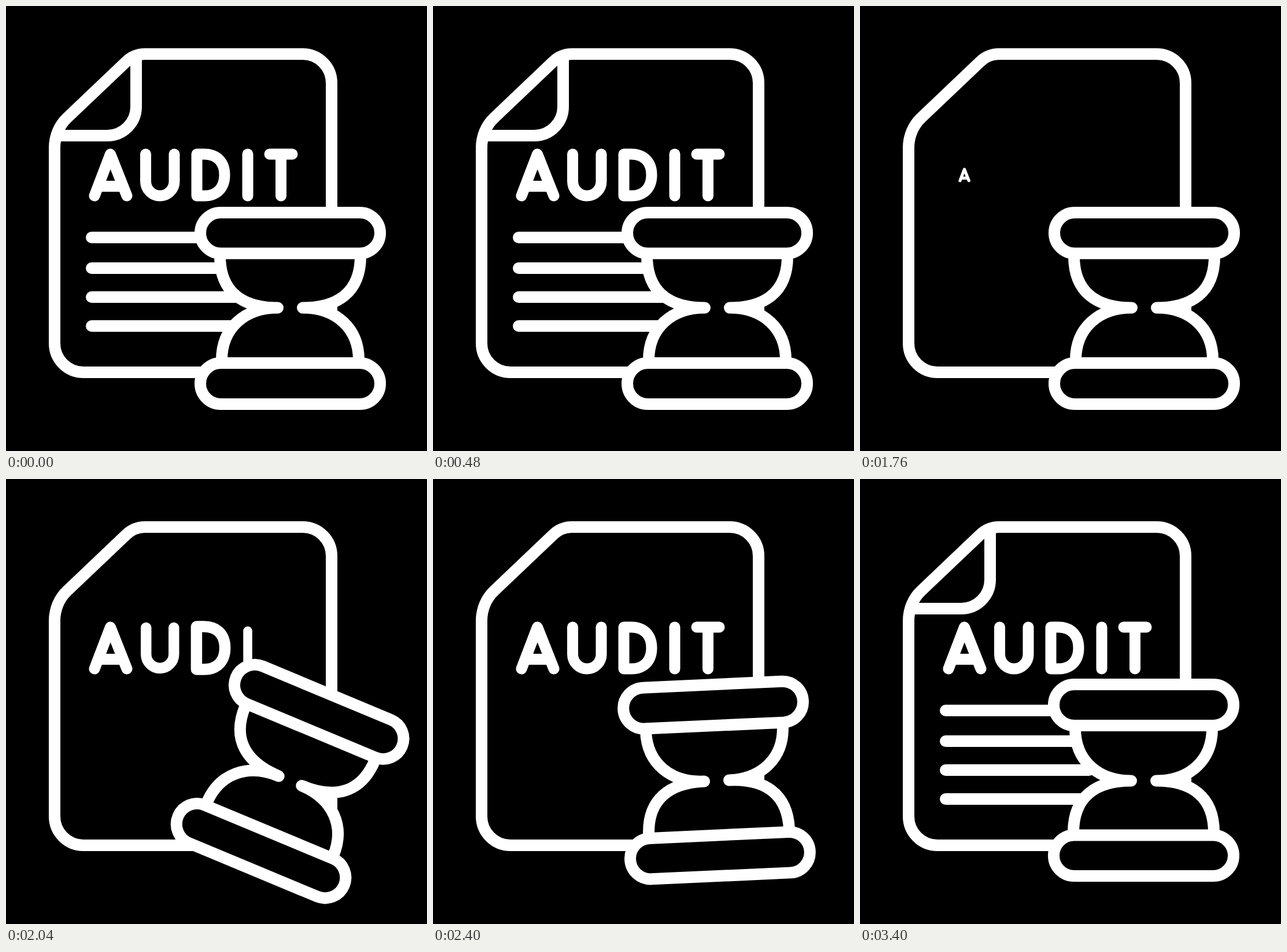
Animation, 728 px wide and 769 px high, one loop 3840 ms. Source, as an HTML page:

```html
<!DOCTYPE html>
<html lang="en">
<head>
<meta charset="utf-8">
<title>Audit</title>
<style>
  html, body { margin: 0; width: 100%; height: 100%; overflow: hidden; background: #000; }
  svg { display: block; width: 100%; height: 100%; }
  path, rect { fill: none; stroke: #fff; stroke-width: 20; stroke-linejoin: round; }
  #lines path, #glass path { stroke-linecap: round; }
  #word path { stroke-width: 19; stroke-linecap: round; }
  #glass rect { fill: #000; }
  #glass .body { fill: #000; stroke: none; }
</style>
</head>
<body>
<svg viewBox="0 0 728 769" role="img" aria-label="AUDIT">
  <g id="doc">
    <path d="M240 83H513A50 50 0 0 1 563 133V583A50 50 0 0 1 513 633H134A50 50 0 0 1 84 583V245C84 225 92 206 106 193L207 97C216 88 228 83 240 83Z"/>
    <path id="fold" pathLength="1" d="M225 88V174A50 50 0 0 1 175 224H90"/>
    <g id="word">
      <path d="M153 328L180.500 256L209 328M166 311.500H196"/>
      <path d="M241.500 256V303A24.750 25 0 0 0 291 303V256"/>
      <path d="M330 256H343C365 256 378 270 378 292S365 328 343 328H330Z"/>
      <path d="M418 256V328"/>
      <path d="M456 256H495M475.500 256V328"/>
    </g>
    <g id="lines"></g>
  </g>
  <g id="glass">
    <path class="body" d="M370 432C370 495 410 521.500 470 521.500C412 521.500 373 557 373 612H610C610 557 571 521.500 513 521.500C573 521.500 613 495 613 432Z"/>
    <path d="M370 432C370 495 410 521.500 470 521.500C412 521.500 373 557 373 612"/>
    <path d="M613 432C613 495 573 521.500 513 521.500C571 521.500 610 557 610 612"/>
    <rect x="336" y="357" width="311" height="70.500" rx="35.250"/>
    <rect x="336" y="617" width="311" height="71" rx="35.500"/>
  </g>
</svg>
<script>
const LOOP = 3840, STEP = 40;
const $ = id => document.getElementById(id);
const doc = $('doc'), fold = $('fold'), glass = $('glass');
const letters = [...$('word').children];
const letterX = [180.5, 266, 354, 418, 475.5];
const lineY = [400, 453, 503, 553];
$('lines').innerHTML = lineY.map(() => '<path/>').join('');
const lines = [...$('lines').children];

const part = (t, from, to) => Math.min(1, Math.max(0, (t - from) / (to - from)));
const ease = p => (1 - Math.cos(Math.PI * p)) / 2;

// Eased value along [time, value] keys
function track(t, keys) {
  let v = keys[0][1];
  for (let i = 1; i < keys.length; i++) {
    const [t0, v0] = keys[i - 1], [t1, v1] = keys[i];
    if (t > t0) v = v0 + (v1 - v0) * ease(part(t, t0, t1));
  }
  return v;
}

const show = (el, on) => el.setAttribute('visibility', on ? 'visible' : 'hidden');
const scaleAt = (x, y, s) => `translate(${x} ${y}) scale(${s}) translate(${-x} ${-y})`;

function draw(t) {
  const intro = t < 600;
  const grow = intro ? 1 : ease(part(t, 640, 920));
  const swing = track(t, [[0, 0], [200, 14.4], [360, -4.2], [480, 0]]);
  const turn = 180 * ease(part(t, 1920, 2440));

  doc.setAttribute('transform', `rotate(${swing} 557 621) ` + scaleAt(323.5, 358, grow));
  glass.setAttribute('transform', `rotate(${turn} 491 521.5) ` + scaleAt(491.5, 522.5, grow));

  letters.forEach((el, i) => {
    const s = intro ? 1 : track(t - 1720 - 80 * i, [[0, 0], [120, 1.09], [200, .96], [320, 1]]);
    show(el, s > 0);
    el.setAttribute('transform', scaleAt(letterX[i], 292, s));
  });

  lines.forEach((el, i) => {
    const start = 2520 + 120 * i;
    const p = intro ? 1 : part(t, start, start + 160);
    show(el, p > 0);
    el.setAttribute('d', `M148 ${lineY[i]}h${248 * p}`);
  });

  const p = intro ? 1 : part(t, 3160, 3400);
  show(fold, p > 0);
  fold.setAttribute('stroke-dasharray', `${p} 2`);
}

function tick() {
  const t = performance.now() % LOOP;
  draw(Math.floor(t / STEP) * STEP);
  requestAnimationFrame(tick);
}
tick();
</script>
</body>
</html>
```
